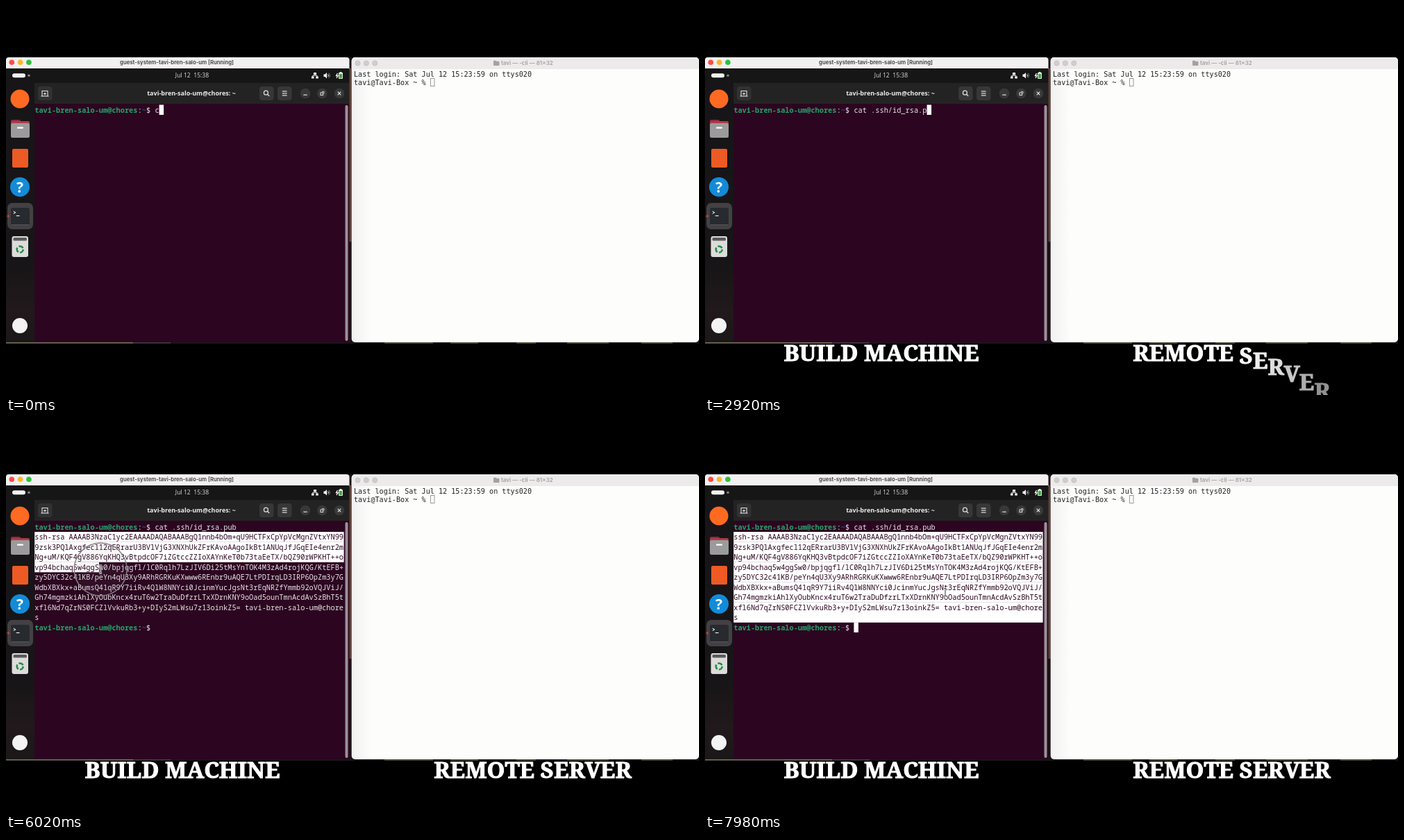
An HTML page with a canvas for the animation above (8000 ms loop, 998 px wide and 561 px high).

```html
<!DOCTYPE html>
<html lang="en">
<head>
<meta charset="utf-8">
<title>Two terminals</title>
<style>
html, body { margin: 0; width: 100%; height: 100%; overflow: hidden; background: #000; }
canvas { display: block; width: 998px; height: 561px; }
</style>
</head>
<body>
<canvas id="stage" width="998" height="561"></canvas>
<script>
const ctx = document.getElementById('stage').getContext('2d');
const LOOP = 8000, ENTER = 3960, LAST_KEY = 3180, PRESS = 4800, RELEASE = 6680;
const USER = 'tavi-bren-salo-um@chores';
const COMMAND = 'cat .ssh/id_rsa.pub';
const COLS = 72, CELL = 6.186, ROW = 14.5, LEFT = 41.2, TOP = 142.5;
const PURPLE = '#2c0620', WHITE = '#fff';
const MONO = '10.31px "Noto Sans Mono", monospace';
const UI = 'Inter, sans-serif';

// Pointer stops: time, x, y
const PATH = [
  [4300, 250, 240], [4750, 44, 163], [5150, 44, 163], [6020, 136, 211],
  [6580, 207, 275], [6900, 207, 275], [7400, 346, 244]
];

const clamp = v => Math.max(0, Math.min(1, v));

function makeKey() {
  const digits = 'ABCDEFGHIJKLMNOPQRSTUVWXYZabcdefghijklmnopqrstuvwxyz0123456789+/';
  let seed = 4127, key = 'ssh-rsa AAAAB3NzaC1yc2EAAAADAQABAAABgQ';
  while (key.length < COLS * 7 + 47) {
    seed = (seed * 1664525 + 1013904223) % 4294967296;
    key += digits[Math.floor(seed / 67108864)];
  }
  key += '= ' + USER;
  return Array.from({ length: 9 }, (_, i) => key.slice(i * COLS, (i + 1) * COLS));
}
const keyRows = makeKey();

function rect(x, y, w, h, fill, radius = 0) {
  ctx.fillStyle = fill;
  ctx.beginPath();
  ctx.roundRect(x, y, w, h, radius);
  ctx.fill();
}

function disc(x, y, r, fill) {
  ctx.fillStyle = fill;
  ctx.beginPath();
  ctx.arc(x, y, r, 0, 7);
  ctx.fill();
}

function line(color, width, ...points) {
  ctx.strokeStyle = color;
  ctx.lineWidth = width;
  ctx.beginPath();
  points.forEach(([x, y], i) => i ? ctx.lineTo(x, y) : ctx.moveTo(x, y));
  ctx.stroke();
}

function arc(x, y, r, color, width, from = 0, to = 7) {
  ctx.strokeStyle = color;
  ctx.lineWidth = width;
  ctx.beginPath();
  ctx.arc(x, y, r, from, to);
  ctx.stroke();
}

function text(value, x, y, font, fill, align = 'left') {
  ctx.font = font;
  ctx.fillStyle = fill;
  ctx.textAlign = align;
  ctx.fillText(value, x, y);
}

function drawBackdrop() {
  rect(0, 0, 998, 561, '#000');
  rect(494, 74, 4, 412, '#1a1315');
  rect(494.5, 90, 3, 250, '#5f4338');
  rect(0, 484, 998, 3, '#17161a');
  rect(0, 485, 183, 1.5, '#77745a');
  rect(183, 485, 54, 1.5, '#3d3d43');
  [[545, 70], [640, 40], [735, 28], [808, 60], [915, 45]]
    .forEach(([x, w]) => rect(x, 485, w, 2, '#4a4936'));
}

function drawDock() {
  rect(0, 110, 41, 375, '#171517');
  const glow = ctx.createLinearGradient(0, 370, 0, 485);
  glow.addColorStop(0, '#171517');
  glow.addColorStop(0.6, '#21191b');
  glow.addColorStop(1, '#1b1719');
  rect(0, 370, 41, 115, glow);

  disc(20, 134, 13.5, '#ff6a22');

  rect(7, 164, 14, 10, '#8d2947', 2);
  rect(7, 166, 27, 10, '#b03a45', 2);
  rect(7, 169, 27, 21, '#9b9b9b', 2.5);
  rect(16, 174.5, 9, 2.2, WHITE, 1);

  rect(9, 206, 23, 27, '#ed5a24', 2);

  disc(20, 261, 14, '#138bd8');
  text('?', 20, 268.5, 'bold 21px "Noto Sans", sans-serif', WHITE, 'center');

  rect(2, 284, 37, 38, '#434143', 7);
  rect(7, 291, 27, 25, '#272a2e', 3);
  line('#54585c', 1, [8, 315.5], [33, 315.5]);
  text('>_', 10, 301, 'bold 8px "Noto Sans Mono", monospace', WHITE);
  disc(3.2, 303, 1.7, '#d0402c');

  rect(8.5, 332, 23.5, 30, '#dcdcda', 3);
  rect(10.5, 334, 19.5, 4.5, '#5a5a5a', 1.5);
  ctx.setLineDash([7, 2.4]);
  arc(20.2, 351, 4.5, '#238b48', 2.6);
  ctx.setLineDash([]);

  disc(20, 461, 11, '#f3f3f3');
}

function drawPanel() {
  rect(0, 90, 494, 21, '#171617');
  rect(9, 97.2, 19, 6, '#f4f4f4', 3);
  disc(33, 100.2, 1.7, '#858585');
  text('Jul 12  15:38', 268, 103.2, '8.6px "Noto Sans", sans-serif', '#d0d0d0', 'center');

  rect(443, 96, 4, 3.4, WHITE);
  rect(440, 101.5, 3.5, 3, WHITE);
  rect(446.3, 101.5, 3.5, 3, WHITE);
  line(WHITE, 0.9, [441.7, 101.5], [441.7, 100.3], [448, 100.3], [448, 101.5]);

  ctx.fillStyle = WHITE;
  ctx.beginPath();
  [[457.5, 98.6], [459.5, 98.6], [462, 96], [462, 104.6], [459.5, 102], [457.5, 102]]
    .forEach(([x, y]) => ctx.lineTo(x, y));
  ctx.fill();
  arc(462, 100.3, 2.3, WHITE, 1, -0.9, 0.9);
  arc(462, 100.3, 4.4, '#8f8f8f', 1, -0.9, 0.9);

  line(WHITE, 1.3, [477.5, 97], [475.5, 100.5], [478, 100.5], [476, 104]);
  rect(479, 96, 6, 9, '#dff0d8', 1);
  rect(480.7, 95, 2.6, 1.2, WHITE);
  rect(480, 98, 4, 6, '#45a64b');
}

function drawHeader() {
  const icon = '#e4e4e4';
  rect(41, 111, 453, 30, '#242324');
  rect(46, 116, 20.5, 20, '#333233', 4);
  line(icon, 1.1, [52, 130], [52, 122.5], [60, 122.5], [60, 130]);
  line(icon, 1.1, [50.5, 130], [61.5, 130]);
  line(icon, 1, [56, 124.5], [56, 128.5]);
  line(icon, 1, [54, 126.5], [58, 126.5]);
  text(USER + ': ~', 267, 129.2, 'bold 9px "Noto Sans", sans-serif', '#ececec', 'center');

  rect(365, 116, 20.5, 20, '#383738', 4);
  arc(374.4, 125.2, 3, icon, 1.2);
  line(icon, 1.3, [376.6, 127.4], [379.2, 130]);
  rect(391, 116, 20.5, 20, '#383738', 4);
  [123, 126, 129].forEach(y => line(icon, 1.2, [397.8, y], [404.6, y]));

  [431, 455.3, 480].forEach(x => disc(x, 126, 7.3, '#393839'));
  line(icon, 1.2, [428.3, 128.2], [433.7, 128.2]);
  ctx.strokeStyle = icon;
  ctx.lineWidth = 1;
  ctx.strokeRect(453, 125, 3.6, 3.6);
  line(icon, 0.8, [455, 123.4], [458, 123.4], [458, 126.5]);
  line(icon, 1.2, [477.7, 123.7], [482.3, 128.3]);
  line(icon, 1.2, [482.3, 123.7], [477.7, 128.3]);
}

function drawLeftWindow() {
  rect(0, 74, 494.5, 17, '#f3f0f1', [4, 4, 0, 0]);
  ['#fe4c45', '#fdb528', '#2ac23f'].forEach((c, i) => disc(8.3 + i * 12.3, 81.3, 3.8, c));
  text('guest-system-tavi-bren-salo-um [Running]', 246, 83.8, '600 7.8px ' + UI, '#3b393a', 'center');
  drawPanel();
  drawDock();
  drawHeader();
  rect(41, 141, 453, 344, PURPLE);
  rect(488.5, 143, 4, 340, '#9b9299', 2);
}

function drawRightWindow() {
  const shade = ctx.createLinearGradient(498, 0, 526, 0);
  shade.addColorStop(0, '#f1f1f1');
  shade.addColorStop(1, '#fdfdfc');
  rect(497.7, 74, 500.3, 411, shade, 5);
  rect(497.7, 74, 500.3, 17, '#eceaea', [5, 5, 0, 0]);
  for (let i = 0; i < 3; i++) {
    disc(506.5 + i * 12.4, 82.5, 3.7, '#cfcdcd');
    arc(506.5 + i * 12.4, 82.5, 3.6, '#bdbbbb', 0.6);
  }
  rect(702, 78.7, 4, 3, '#a3a1a1', 0.8);
  rect(702, 79.7, 8.5, 6.3, '#a3a1a1', 1);
  text('tavi — -cli — 81×32', 713, 85.2, '600 8px ' + UI, '#a19f9f');
  const font = '10.13px "DejaVu Sans Mono", monospace';
  text('Last login: Sat Jul 12 15:23:59 on ttys020', 501, 101.6, font, '#222');
  text('tavi@Tavi-Box ~ % ', 501, 113.8, font, '#222');
  ctx.strokeStyle = '#9a9a9a';
  ctx.lineWidth = 1;
  ctx.strokeRect(611.5, 104.5, 5.5, 11);
}

const cellX = col => LEFT + col * CELL;
const rowY = row => TOP + row * ROW;

function termText(value, col, row, fill, weight = '') {
  text(value, cellX(col), rowY(row) + 11, weight + MONO, fill);
}

function drawPrompt(row) {
  termText(USER, 0, row, '#26a269', 'bold ');
  termText(':', 24, row, '#e8e4e7');
  termText('~', 25, row, '#2a5a9c', 'bold ');
  termText('$', 26, row, '#e8e4e7');
}

function pointerAt(t) {
  let i = 0;
  while (i < PATH.length - 2 && t > PATH[i + 1][0]) i++;
  const [t0, x0, y0] = PATH[i], [t1, x1, y1] = PATH[i + 1];
  const p = clamp((t - t0) / (t1 - t0));
  return [x0 + (x1 - x0) * p, y0 + (y1 - y0) * p];
}

function drawKey(t) {
  const [px, py] = pointerAt(Math.min(t, 6580));
  const endRow = t < PRESS ? 0 : Math.floor((py - TOP) / ROW);
  const endCol = Math.floor((px - LEFT) / CELL);
  keyRows.forEach((value, i) => {
    const row = i + 1;
    let selected = row < endRow ? COLS : row === endRow ? endCol : 0;
    if (selected >= value.length) selected = COLS;
    if (selected) rect(LEFT, rowY(row), selected * CELL, ROW + 0.3, WHITE);
    termText(value.slice(0, selected), 0, row, PURPLE);
    termText(value.slice(selected), selected, row, '#e8e4e7');
  });
}

function drawTerminal(t) {
  const entered = t >= ENTER;
  const typed = Math.floor(t < 2401 ? 1 + t / 195 : 13 + (t - 2400) / 130);
  const shown = COMMAND.slice(0, typed);
  const lastInput = entered ? ENTER : LAST_KEY;
  const cursorOn = t < lastInput || (t - lastInput) % 1200 < 600;

  drawPrompt(0);
  termText(shown, 28, 0, '#e8e4e7');
  if (entered) {
    drawKey(t);
    drawPrompt(10);
  }
  if (cursorOn) {
    rect(cellX(entered ? 28 : 28 + shown.length), rowY(entered ? 10 : 0), CELL + 0.3, ROW, WHITE);
  }
}

function drawPointer(t) {
  if (t < PATH[0][0]) return;
  const [x, y] = pointerAt(t);
  ctx.globalAlpha = clamp((t - PRESS + 100) / 100) * clamp((RELEASE + 150 - t) / 150);
  disc(x, y, 38, 'rgba(128,128,128,0.07)');
  arc(x, y, 38, '#858085', 1.5);
  ctx.globalAlpha = 1;
  for (const [color, width] of [['#eee', 2.6], ['#555', 1.1]]) {
    line(color, width, [x, y - 5], [x, y + 5]);
    line(color, width, [x - 2, y - 5.5], [x + 2, y - 5.5]);
    line(color, width, [x - 2, y + 5.5], [x + 2, y + 5.5]);
  }
}

// Letters rise from below one after another while fading in.
function drawCaption(value, center, start, t) {
  const font = 'bold 33px "Noto Serif", serif';
  ctx.font = font;
  ctx.lineJoin = 'miter';
  const left = center - ctx.measureText(value).width / 2;
  [...value].forEach((letter, i) => {
    const p = clamp((t - start - i * 50) / 500);
    if (!p) return;
    ctx.font = font;
    const x = left + ctx.measureText(value.slice(0, i)).width;
    const y = 512.3 + 115 * (1 - p) ** 1.5;
    const level = Math.round(255 * (1 - (1 - p) ** 1.7));
    const shade = `rgb(${level},${level},${level})`;
    text(letter, x, y, font, shade);
    // A thin outline gives the serifs their slab weight.
    ctx.strokeStyle = shade;
    ctx.lineWidth = 1;
    ctx.strokeText(letter, x, y);
  });
}

function frame(now) {
  const t = now % LOOP;
  drawBackdrop();
  drawLeftWindow();
  drawRightWindow();
  drawTerminal(t);
  drawPointer(t);
  drawCaption('BUILD MACHINE', 254, 1000, t);
  drawCaption('REMOTE SERVER', 758.5, 2125, t);
}

function tick() {
  frame(performance.now());
  requestAnimationFrame(tick);
}
tick();
</script>
</body>
</html>
```
